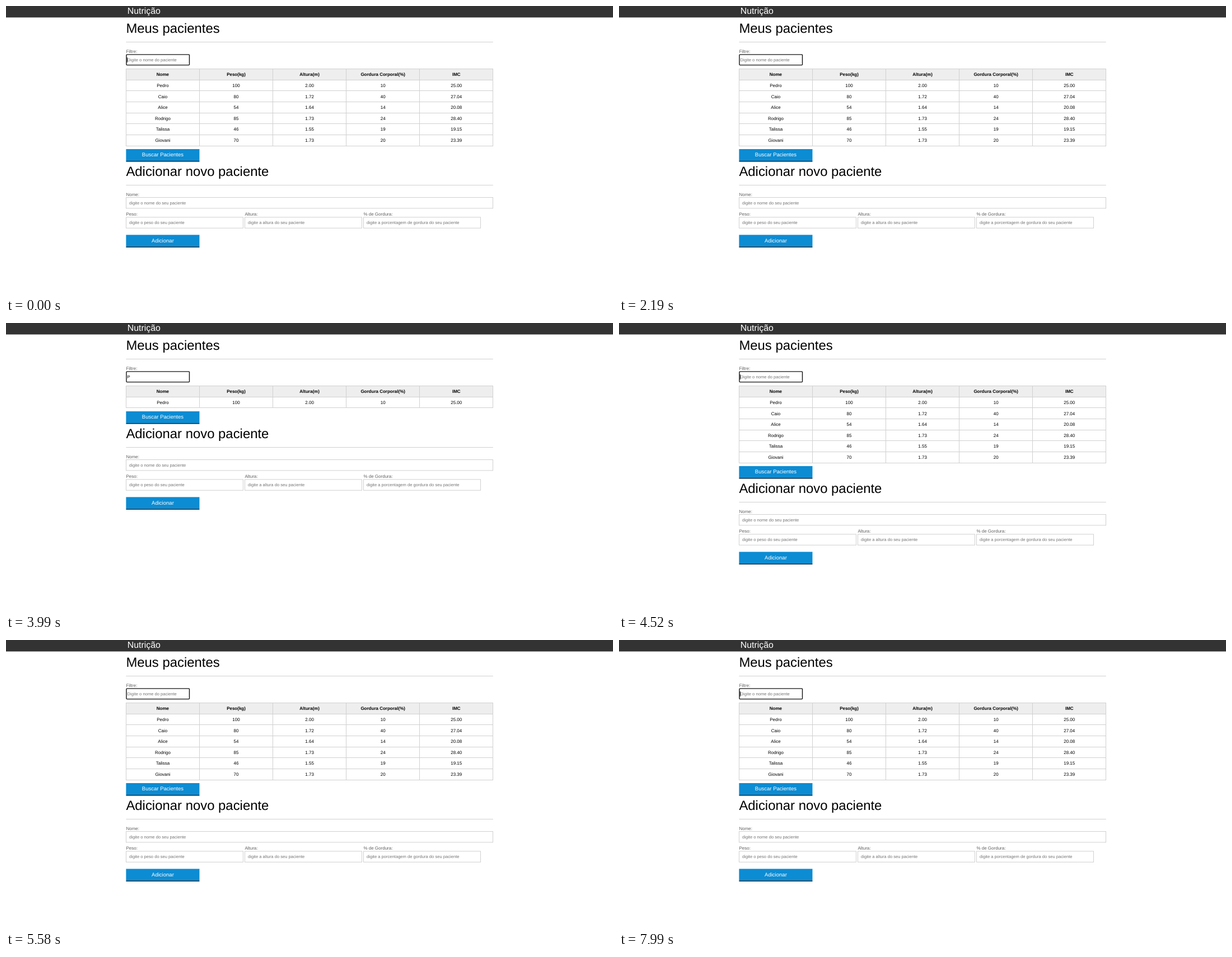
These frames come from a looping animation (1084x517 px, 8.05 s). An HTML page with a canvas:

```html
<!DOCTYPE html>
<html lang="pt-BR">
<head>
<meta charset="utf-8">
<title>Nutrição</title>
<style>
html, body { margin: 0; width: 100%; height: 100%; overflow: hidden; background: #fff; }
canvas { display: block; }
</style>
</head>
<body>
<canvas id="stage" width="1084" height="517"></canvas>
<script>
const ctx = document.getElementById('stage').getContext('2d');
const LOOP = 8050;
const LEFT = 214.4, COL = 131.08, WIDTH = COL * 5, TOP = 112, PITCH = 19.65;
const LINE = '#d0d0d0', INPUT_SIZE = 7.6;

const headers = ['Nome', 'Peso(kg)', 'Altura(m)', 'Gordura Corporal(%)', 'IMC'];
const patients = [
  ['Pedro', '100', '2.00', '10', '25.00'],
  ['Caio', '80', '1.72', '40', '27.04'],
  ['Alice', '54', '1.64', '14', '20.08'],
  ['Rodrigo', '85', '1.73', '24', '28.40'],
  ['Talissa', '46', '1.55', '19', '19.15'],
  ['Giovani', '70', '1.73', '20', '23.39']
];

// [start in ms, filter text, caret visible]
const steps = [
  [0, '', 1], [120, '', 0], [720, '', 1],
  [1120, 'G', 1], [1310, 'Gi', 1], [1460, 'Gio', 1], [1540, 'Giov', 1],
  [1630, 'Giova', 1], [1720, 'Giovan', 1],
  [2190, '', 0], [2250, '', 1], [2790, '', 0],
  [3190, 'P', 1], [3330, 'Pe', 1], [3460, 'Ped', 1], [3860, 'Pe', 1], [3990, 'P', 0],
  [4180, '', 0], [4520, '', 1],
  [4850, 't', 1], [5380, 't', 0],
  [5580, '', 0], [5920, '', 1], [6450, '', 0], [6930, '', 1], [7460, '', 0], [7990, '', 1]
];

function rect(x, y, w, h, color) {
  ctx.fillStyle = color;
  ctx.fillRect(x, y, w, h);
}

function text(str, x, y, size, color = '#000', { bold = false, align = 'left' } = {}) {
  ctx.font = `${bold ? 'bold ' : ''}${size}px "Liberation Sans", Arial, sans-serif`;
  ctx.textAlign = align;
  ctx.fillStyle = color;
  ctx.fillText(str, x, y);
}

function heading(str, y) {
  text(str, LEFT, y + 48.2, 23.9);
  rect(LEFT, y + 64, WIDTH, 1, LINE);
}

const label = (str, x, y) => text(str, x, y, 8, '#606060');
const placeholder = (str, x, y) => text(str, x, y, INPUT_SIZE, '#757575');

function field(x, y, w, hint) {
  ctx.strokeStyle = LINE;
  ctx.lineWidth = 1;
  ctx.strokeRect(Math.floor(x) + .5, y + .5, Math.floor(w) - 1, 19.4);
  placeholder(hint, x + 5.6, y + 12.9);
}

function button(str, y) {
  rect(LEFT, y, COL, 20.9, '#0c8cd3');
  rect(LEFT, y + 20.9, COL, 1.7, '#08304f');
  text(str, LEFT + COL / 2, y + 13.3, 9.55, '#fff', { align: 'center' });
}

function filterBox(value, caret) {
  label('Filtre:', LEFT, 83.6);
  ctx.strokeStyle = '#101010';
  ctx.lineWidth = 1.4;
  ctx.beginPath();
  ctx.roundRect(215, 86.9, 112.5, 18.7, 1);
  ctx.stroke();
  if (value) text(value, 216.6, 99.1, INPUT_SIZE);
  else placeholder('Digite o nome do paciente', 216.6, 99.1);
  if (caret) {
    const advance = value ? ctx.measureText(value).width : 0;
    rect(Math.floor(216.6 + advance), 92, 1, 9, '#333');
  }
}

function table(rows) {
  const lineY = k => TOP + Math.round(PITCH * k);
  const lineX = c => Math.floor(LEFT + COL * c);
  const bottom = lineY(rows.length + 1);
  rect(LEFT, TOP, WIDTH, lineY(1) - TOP, '#eee');
  for (let k = 0; k <= rows.length + 1; k++) rect(LEFT, lineY(k), WIDTH, 1, LINE);
  for (let c = 0; c <= 5; c++) rect(lineX(c), TOP, 1, bottom - TOP + 1, LINE);
  [headers, ...rows].forEach((cells, k) => cells.forEach((cell, c) =>
    text(cell, LEFT + COL * (c + .5), 125.2 + PITCH * k, 8, '#000', { bold: k === 0, align: 'center' })));
}

function form(y) {
  button('Buscar Pacientes', y);
  heading('Adicionar novo paciente', y);
  label('Nome:', LEFT, y + 83.6);
  field(LEFT, y + 86, WIDTH + 1, 'digite o nome do seu paciente');
  const fields = [
    ['Peso:', 'digite o peso do seu paciente'],
    ['Altura:', 'digite a altura do seu paciente'],
    ['% de Gordura:', 'digite a porcentagem de gordura do seu paciente']
  ];
  fields.forEach(([name, hint], i) => {
    const x = LEFT + i * 212;
    label(name, x, y + 118.8);
    field(x, y + 121.4, 210, hint);
  });
  button('Adicionar', y + 153.4);
}

function draw(time) {
  const [, value, caret] = steps.findLast(step => step[0] <= time);
  const query = value.toLowerCase();
  const rows = patients.filter(row => row[0].toLowerCase().includes(query));
  ctx.textRendering = 'geometricPrecision';
  rect(0, 0, 1084, 517, '#fff');
  rect(0, 0, 1084, 20.5, '#333');
  text('Nutrição', 216.7, 13.7, 15.9, '#fff');
  heading('Meus pacientes', 0);
  filterBox(value, caret);
  table(rows);
  form(256 - Math.round(PITCH * (patients.length - rows.length)));
}

const start = performance.now();
function tick() {
  draw((performance.now() - start) % LOOP);
  requestAnimationFrame(tick);
}
tick();
</script>
</body>
</html>
```
